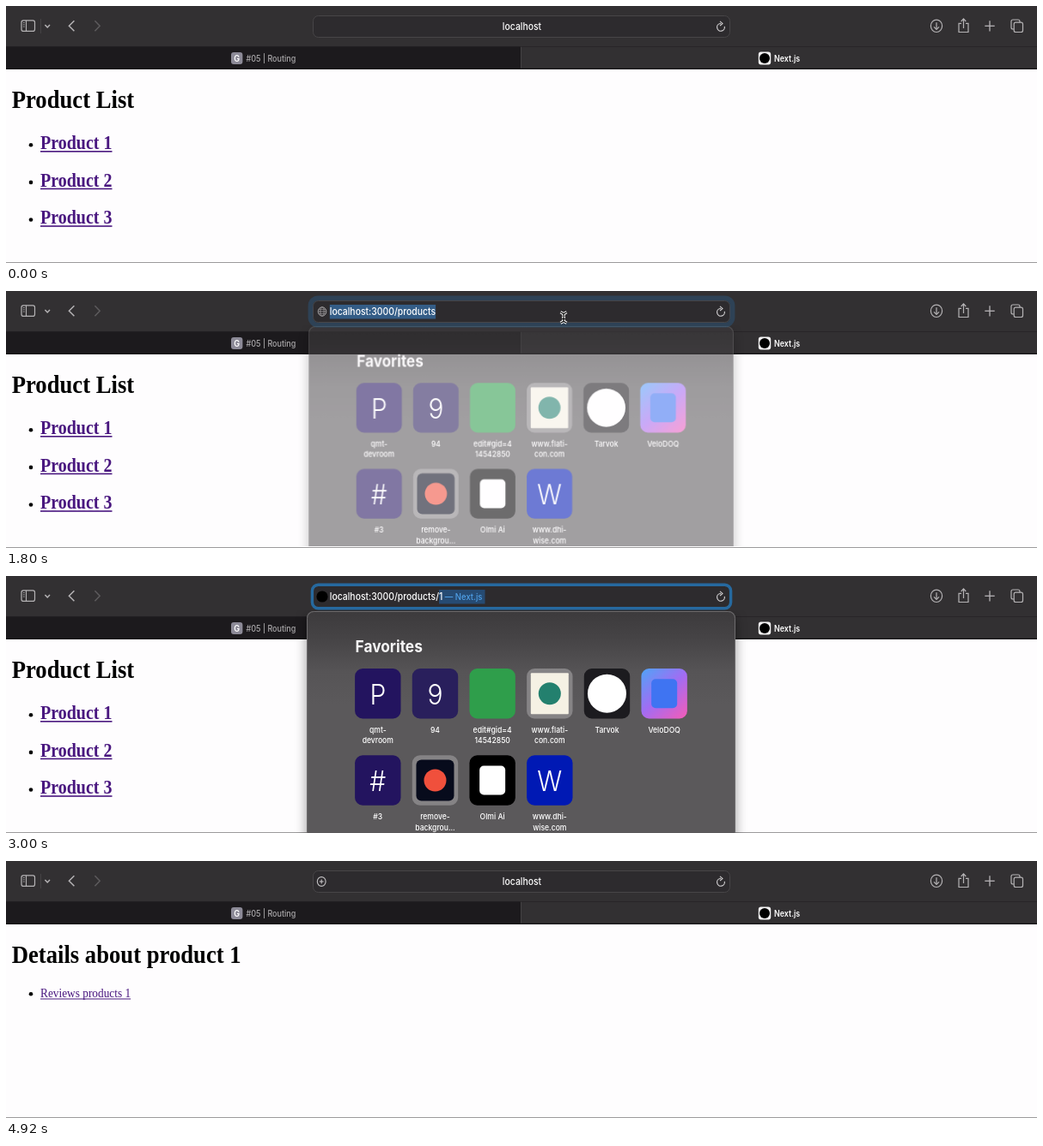
Animation, 1200 px wide and 300 px high, one loop 5 s. Source, as an HTML page with a canvas:

```html
<!DOCTYPE html>
<html lang="en">
<head>
<meta charset="utf-8">
<title>Product pages</title>
<style>
html, body { margin: 0; width: 100%; height: 100%; overflow: hidden; background: #323032; }
canvas { display: block; width: 1200px; height: 300px; }
</style>
</head>
<body>
<canvas id="stage"></canvas>
<script>
const W = 1200, H = 300, LOOP = 5000;
const SX = 0.8333, SY = 0.92; // the recorded window is 1440 units wide
const UI = 'Inter, Roboto, sans-serif';
const SERIF = '"Liberation Serif", "Times New Roman", serif';
const URL_FONT = '500 12.5px ' + UI;
const dpr = window.devicePixelRatio || 1;

function surface(canvas) {
  canvas.width = W * dpr;
  canvas.height = H * dpr;
  const c = canvas.getContext('2d');
  c.scale(dpr, dpr);
  return c;
}

const stage = surface(document.getElementById('stage'));
let g = stage;

const clamp = v => Math.max(0, Math.min(1, v));
const ramp = (t, a, b) => clamp((t - a) / (b - a));
const smooth = p => p * p * (3 - 2 * p);
const mix = (a, b, p) => a + (b - a) * p;

function rect(x, y, w, h, fill) {
  g.fillStyle = fill;
  g.fillRect(x, y, w, h);
}

function round(x, y, w, h, r, fill, stroke, lw = 1) {
  g.beginPath();
  g.roundRect(x, y, w, h, r);
  if (fill) { g.fillStyle = fill; g.fill(); }
  if (stroke) { g.strokeStyle = stroke; g.lineWidth = lw; g.stroke(); }
}

function disc(x, y, r, fill) {
  g.beginPath();
  g.arc(x, y, r, 0, Math.PI * 2);
  g.fillStyle = fill;
  g.fill();
}

function ring(x, y, rx, ry, color, lw = 1) {
  g.beginPath();
  g.ellipse(x, y, rx, ry, 0, 0, Math.PI * 2);
  g.strokeStyle = color;
  g.lineWidth = lw;
  g.stroke();
}

function line(color, lw, ...pts) {
  g.beginPath();
  for (let i = 0; i < pts.length; i += 2) g.lineTo(pts[i], pts[i + 1]);
  g.strokeStyle = color;
  g.lineWidth = lw;
  g.stroke();
}

function text(str, x, y, font, color, align = 'left') {
  g.save();
  g.translate(x, y);
  g.scale(SX, SY);
  g.font = font;
  g.fillStyle = color;
  g.textAlign = align;
  g.fillText(str, 0, 0);
  g.restore();
}

function width(str, font) {
  g.font = font;
  return g.measureText(str).width * SX;
}

function withAlpha(a, draw) {
  if (a <= 0) return;
  g.save();
  g.globalAlpha = a;
  draw();
  g.restore();
}

// ---- favorites panel, drawn once ----
const tiles = [
  { fill: '#23145f', letter: 'P', label: ['qmt-', 'devroom'] },
  { fill: '#291f5c', letter: '9', label: ['94'] },
  { fill: '#2f9e4b', label: ['edit#gid=4', '14542850'] },
  { fill: '#858385', inner: '#f5f1e4', corner: 1, dot: '#23806e', label: ['www.flati-', 'con.com'] },
  { fill: '#1c1b1f', disc: '#fff', label: ['Tarvok'] },
  { fill: 'blend', square: '#3f74f2', label: ['VeloDOQ'] },
  { fill: '#23145f', letter: '#', label: ['#3'] },
  { fill: '#858385', inner: '#070b1c', corner: 6, dot: '#f0503c', label: ['remove-', 'backgrou...'] },
  { fill: '#000', square: '#fff', label: ['Olmi Ai'] },
  { fill: '#0019b4', letter: 'W', label: ['www.dhi-', 'wise.com'] }
];

function blend(x, y) {
  const f = g.createLinearGradient(x, y, x + 53, y + 58);
  f.addColorStop(0, '#4fa4f8');
  f.addColorStop(0.5, '#a26cf2');
  f.addColorStop(1, '#f45cb8');
  return f;
}

function drawTile(tile, i) {
  const cx = 432.8 + (i % 6) * 66.67, top = i < 6 ? 108 : 209.3;
  const x = cx - 26.7, cy = top + 29.2;
  round(x, top, 53.4, 58.4, 9, tile.fill === 'blend' ? blend(x, top) : tile.fill);
  if (tile.inner) round(cx - 22, cy - 24, 44, 48, tile.corner, tile.inner);
  if (tile.dot) disc(cx, cy, 13, tile.dot);
  if (tile.disc) disc(cx, cy, 22.5, tile.disc);
  if (tile.square) round(cx - 15, cy - 17, 30, 34, 5, tile.square);
  if (tile.letter) text(tile.letter, cx, cy + 12.3, '300 36px ' + UI, '#fff', 'center');
  tile.label.forEach((s, n) =>
    text(s, cx, top + 74.9 + n * 12.4, '500 10.3px ' + UI, '#fff', 'center'));
}

const panel = document.createElement('canvas');
g = surface(panel);
const shade = g.createLinearGradient(0, 41, 0, 150);
shade.addColorStop(0, '#3c3a3c');
shade.addColorStop(0.3, '#464446');
shade.addColorStop(0.65, '#565456');
shade.addColorStop(1, '#5b595b');
g.save();
g.shadowColor = 'rgba(0, 0, 0, 0.4)';
g.shadowBlur = 14 * dpr;
g.shadowOffsetY = 5 * dpr;
round(350, 41, 499, 290, 8, '#5b595b');
g.restore();
round(350.5, 41.5, 498, 290, 8, shade, '#6d6b6d');
text('Favorites', 406.5, 88.8, '700 20.8px ' + UI, '#f6f5f6');
tiles.forEach(drawTile);
g = stage;

// ---- page ----
function link(str, x, y, font, thick, drop) {
  const color = '#49177f';
  text(str, x, y, font, color);
  rect(x, y + drop, width(str, font), thick, color);
}

function drawPage(details) {
  rect(0, 73, W, 227, '#fefdfe');
  const h1 = 'bold 32px ' + SERIF;
  if (details) {
    text('Details about product 1', 6.7, 119, h1, '#000');
    disc(29, 155.3, 2.3, '#000');
    link('Reviews products 1', 40, 159, '16px ' + SERIF, 1, 1.5);
  } else {
    text('Product List', 6.7, 119, h1, '#000');
    for (let i = 0; i < 3; i++) {
      const y = 167 + i * 43.6;
      disc(29, y - 4.7, 2.3, '#000');
      link('Product ' + (i + 1), 40, y, 'bold 24px ' + SERIF, 1.6, 2);
    }
  }
  rect(0, 299, W, 1, '#9c9b9c');
}

// ---- browser chrome ----
function drawChrome(loading, focused) {
  const ink = '#b5b3b5', dim = '#5d5b5d';
  rect(0, 0, W, 74, '#323032');
  rect(0, 47, 599, 26, '#1c1a1d');
  rect(599, 47, 1, 26, '#444244');
  rect(0, 47, W, 0.7, '#242225');
  rect(0, 72.6, W, 1.2, '#151416');

  round(18, 16.8, 15.5, 12.6, 2.2, null, ink, 1.2);
  line(ink, 1.1, 23.5, 17, 23.5, 29.4);
  for (let y = 19.5; y < 25; y += 2.3) line(ink, 0.8, 19.8, y, 21.8, y);
  if (!focused) line('#454345', 1, 40.5, 15, 40.5, 32);
  line(ink, 1.5, 45.4, 22, 48.2, 25, 51, 22);
  line(ink, 1.5, 79.4, 17.2, 73.4, 23.2, 79.4, 29.2);
  line(dim, 1.5, 103.4, 17.2, 109.2, 23.2, 103.4, 29.2);

  ring(1083, 23.3, 6.6, 7.2, ink, 1.2);
  line(ink, 1.2, 1083, 19.3, 1083, 27);
  line(ink, 1.2, 1080, 24.3, 1083, 27.3, 1086, 24.3);
  const share = loading ? '#545254' : ink;
  line(share, 1.2, 1112, 20.3, 1109, 20.3, 1109, 30.5, 1120, 30.5, 1120, 20.3, 1117, 20.3);
  line(share, 1.2, 1114.5, 26, 1114.5, 15.5);
  line(share, 1.2, 1111.7, 18, 1114.5, 15, 1117.3, 18);
  line(ink, 1.3, 1139.3, 23.3, 1150.7, 23.3);
  line(ink, 1.3, 1145, 17.2, 1145, 29.4);
  round(1170, 16, 10, 11, 2, null, ink, 1.2);
  round(1173.2, 19.2, 10.3, 11.3, 2, '#323032', ink, 1.2);

  round(262, 54, 13.4, 14, 3, '#8c8a97');
  text('G', 268.7, 64.8, '600 11px ' + UI, '#fff', 'center');
  text('#05 | Routing', 279.5, 65, '500 10.8px ' + UI, '#a9a7a9');
  round(875.8, 53.6, 14.4, 14.8, 3, '#f4f3f4');
  disc(883, 61, 6, '#000');
  text('Next.js', 894, 65, '600 10.7px ' + UI, '#fff');
}

function drawReload(loading) {
  const ink = '#d0ced0';
  if (loading) {
    line(ink, 1.2, 828, 19.8, 836.4, 28.4);
    line(ink, 1.2, 836.4, 19.8, 828, 28.4);
    return;
  }
  g.beginPath();
  g.arc(832, 24.8, 4.4, -0.2, Math.PI * 1.5);
  g.strokeStyle = ink;
  g.lineWidth = 1.2;
  g.stroke();
  line(ink, 1.1, 831, 17.8, 834, 20.4, 831, 23);
}

function drawGlobe() {
  const ink = '#9c9a9c';
  ring(368, 24, 4.8, 5.2, ink);
  ring(368, 24, 2.2, 5.2, ink, 0.8);
  line(ink, 0.8, 363.2, 24, 372.8, 24);
  line(ink, 0.7, 364, 21.4, 372, 21.4);
  line(ink, 0.7, 364, 26.6, 372, 26.6);
}

function drawEditing(t) {
  const base = 'localhost:3000/products', x = 376.8;
  const end = x + width(base, URL_FONT);
  const typed = t >= 2560;
  if (!typed) {
    drawGlobe();
    if (t < 2400) rect(x, 16, end - x, 16.5, '#345d87');
    else rect(end + 0.5, 16.5, 1, 15.5, '#3d9bf0');
    text(base, x, 28, URL_FONT, '#fff');
    return;
  }
  disc(368, 24, 6.6, '#000');
  const from = x + width(base + '/', URL_FONT);
  const one = width('1', URL_FONT);
  const hint = ' \u2014 Next.js', hintFont = '500 11.4px ' + UI;
  rect(from, 16, one + width(hint, hintFont) + 3, 16.5, '#264b73');
  text(base + '/1', x, 28, URL_FONT, '#fff');
  text(hint, from + one, 28, hintFont, '#4f9fe6');
}

function drawAddress(t, open, ringAlpha, loading) {
  const edit = t >= 1740 && t < 3400;
  round(357.5, 11.5, 485, 25, 6, '#2d2b2e', '#474547');
  withAlpha(ringAlpha, () => {
    const extra = t < 3000 ? 7.3 * (1 - open) : 0;
    const lw = 3.4 + extra * 0.7, o = 2.8 + extra - lw / 2;
    round(357.5 - o, 11.3 - o, 485 + 2 * o, 25.4 + 2 * o, 6 + o, null, '#26699f', lw);
  });
  if (edit) {
    drawEditing(t);
  } else {
    const host = 'localhost', rest = ':3000/products/1';
    const hostW = width(host, URL_FONT);
    const shift = t < 3400 ? 1 : smooth(ramp(t, 3520, 3760));
    const full = hostW + width(rest, URL_FONT);
    const x = mix(600.5 - full / 2, 600.5 - hostW / 2, shift);
    text(host, x, 28, URL_FONT, '#fff');
    withAlpha(clamp(1 - shift * 1.2), () => text(rest, x + hostW, 28, URL_FONT, '#a5a3a5'));
  }
  withAlpha(t < 3400 ? 0 : 1 - ramp(t, 3700, 3840), () => {
    g.save();
    g.beginPath();
    g.roundRect(357.5, 11.5, 485, 25, 6);
    g.clip();
    rect(357.5, 34.8, 485 * smooth(ramp(t, 3400, 3640)), 1.8, '#4a9de0');
    g.restore();
  });
  withAlpha(ramp(t, 4080, 4280), () => {
    ring(367.2, 24, 4.9, 5.4, '#c4c2c4', 1.1);
    line('#c4c2c4', 1.1, 364.8, 24, 369.6, 24);
    line('#c4c2c4', 1.1, 367.2, 21.4, 367.2, 26.6);
  });
  drawReload(loading);
}

function drawPanel(open) {
  withAlpha(open, () => {
    const s = 1 - 0.02 * (1 - open);
    g.beginPath();
    g.rect(0, 40, W, H);
    g.clip();
    g.translate(599.5, 24);
    g.scale(s, s);
    g.translate(-599.5, -24);
    // the panel runs past the bottom edge, so shrinking must not lift it
    g.drawImage(panel, 0, 0, W, H);
  });
}

// ---- pointer ----
function pointerAt(t) {
  if (t < 600) {
    const p = smooth(ramp(t, 40, 600));
    return [mix(88, 106, p), mix(166, 193, p)];
  }
  if (t < 1160) {
    const p = smooth(ramp(t, 600, 1160)), q = 1 - p;
    const bez = (a, b, c, d) => q * q * q * a + 3 * q * q * p * b + 3 * q * p * p * c + p * p * p * d;
    return [bez(106, 180, 520, 654), bez(193, 300, 150, 45)];
  }
  const p = smooth(ramp(t, 1160, 1420));
  return [mix(654, 648.6, p), mix(45, 29.5, p)];
}

function drawPointer(t) {
  if (t < 40 || t >= 2400) return;
  if (t < 1720) {
    const [x, y] = pointerAt(t);
    g.save();
    g.translate(x, y);
    g.beginPath();
    [[0, 0], [0, 13.5], [3, 10.8], [5, 15.6], [7.2, 14.6], [5.2, 9.9], [9, 9.6]]
      .forEach(([a, b]) => g.lineTo(a, b));
    g.closePath();
    g.lineJoin = 'round';
    g.strokeStyle = '#fff';
    g.lineWidth = 2;
    g.stroke();
    g.fillStyle = '#000';
    g.fill();
    g.restore();
    return;
  }
  for (const [color, lw] of [['#fff', 3.2], ['#000', 1.2]]) {
    line(color, lw, 645.4, 24.8, 649, 26.6, 652.6, 24.8);
    line(color, lw, 649, 26.4, 649, 35.6);
    line(color, lw, 645.4, 37.2, 649, 35.4, 652.6, 37.2);
    line(color, lw, 647, 32.6, 651, 32.6);
  }
}

function draw(t) {
  const opening = t < 1722 ? 0 : 1 - Math.exp((1722 - t) / 93);
  const open = opening * (1 - ramp(t, 3200, 3360));
  const ringAlpha = opening * opening * (1 - ramp(t, 3320, 3480));
  const loading = t >= 3400 && t < 3800;
  g.clearRect(0, 0, W, H);
  drawPage(t >= 3560);
  drawChrome(loading, t >= 1740 && t < 3400);
  drawPanel(open);
  drawAddress(t, open, ringAlpha, loading);
  drawPointer(t);
}

// one extra strip keeps the shrunken panel flush with the bottom edge
g = panel.getContext('2d');
g = stage;

const start = performance.now();
function tick() {
  draw((performance.now() - start) % LOOP);
  requestAnimationFrame(tick);
}
tick();
</script>
</body>
</html>
```
